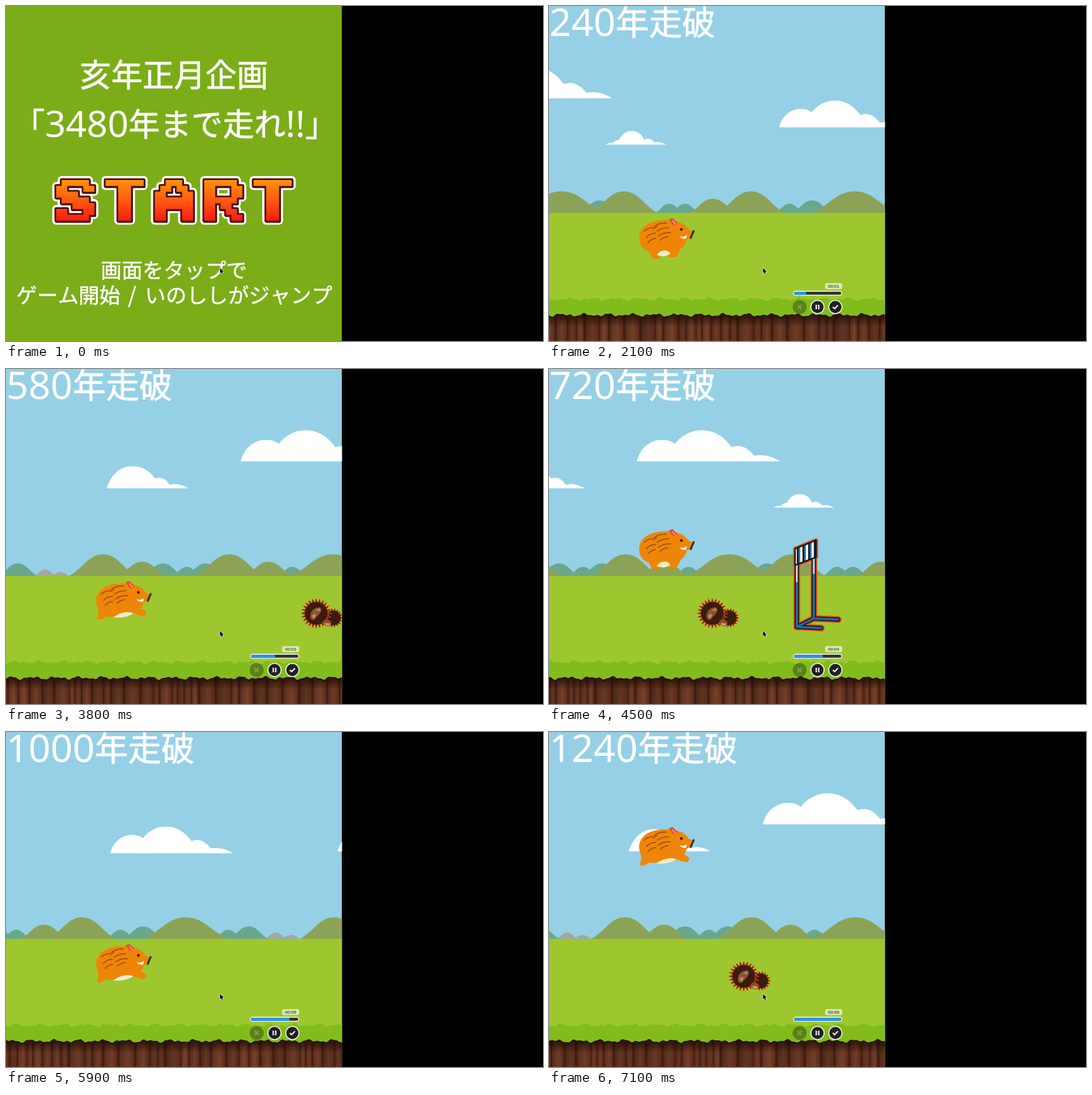
An HTML page with a canvas for the animation above (7200 ms loop, 947 by 591 pixels).

```html
<!DOCTYPE html>
<html lang="ja">
<head>
<meta charset="utf-8">
<style>
html, body { margin: 0; width: 100%; height: 100%; overflow: hidden; background: #000; }
canvas { display: block; }
</style>
</head>
<body>
<canvas id="stage" width="947" height="591"></canvas>
<script>
const ctx = document.getElementById('stage').getContext('2d');
const LOOP = 7200, STEP = 100, GAME_START = 900;
const VIEW = 592.5, WORLD = 1184, SPEED = 0.37;
const KANA = '"Noto Sans CJK JP", "Noto Sans CJK", sans-serif';

function fill(shape, color) {
  ctx.fillStyle = color;
  ctx.fill(typeof shape === 'string' ? new Path2D(shape) : shape);
}

function stroke(shape, color, width) {
  ctx.strokeStyle = color;
  ctx.lineWidth = width;
  ctx.stroke(typeof shape === 'string' ? new Path2D(shape) : shape);
}

function disc(x, y, r) {
  const p = new Path2D();
  p.arc(x, y, r, 0, 7);
  return p;
}

function box(x, y, w, h, r) {
  const p = new Path2D();
  p.roundRect(x, y, w, h, r);
  return p;
}

function at(x, y, draw, scale = 1) {
  ctx.save();
  ctx.translate(x, y);
  ctx.scale(scale, scale);
  draw();
  ctx.restore();
}

// Numerals use a wider face than the Japanese glyphs; a thin stroke adds weight.
function text(str, x, y, size) {
  ctx.fillStyle = ctx.strokeStyle = '#fff';
  ctx.lineWidth = size / 60;
  ctx.lineJoin = 'round';
  ctx.textAlign = 'left';
  for (const run of str.split(/([\d!]+)/)) {
    const latin = /[\d!]/.test(run), base = y - (latin ? 0 : 2);
    ctx.font = latin ? `${size * 1.165}px "Noto Sans", sans-serif` : `${size}px ${KANA}`;
    ctx.fillText(run, x, base);
    if (!latin) ctx.strokeText(run, x, base);
    x += ctx.measureText(run).width;
  }
}

// ---------- title ----------
const GLYPHS = {
  S: '.#####. ##...## ####... .#####. ...#### ##...## ######.',
  T: '###### ..##.. ..##.. ..##.. ..##.. ..##.. ..##..',
  A: '..###.. .##.##. ##...## ####### ####### ##...## ##...##',
  R: '######. ##...## ##...## ######. ##.##.. ##..##. ##...##'
};
const logo = new Path2D();
[...'START'].forEach((letter, i) => {
  GLYPHS[letter].split(' ').forEach((row, r) => {
    const w = 67 / row.length;
    [...row].forEach((c, k) => {
      if (c === '#') logo.rect(88.5 + i * 87 + k * w, 307 + r * 10.2, w + 0.3, 10.5);
    });
  });
});

function drawTitle() {
  ctx.fillStyle = '#7bad18';
  ctx.fillRect(0, 0, VIEW, 591);
  text('亥年正月企画', 130, 144, 55.4);
  text('「3480年まで走れ!!」', 13, 231, 55.4);
  text('画面をタップで', 167, 482, 36.9);
  text('ゲーム開始', 18, 526, 36.7);
  text('/', 215, 526, 38);
  text('いのししがジャンプ', 245, 526, 36.7);
  ctx.lineJoin = 'round';
  stroke(logo, '#fff', 14);
  stroke(logo, '#4b0f08', 6);
  at(0.8, 1.2, () => stroke(logo, '#4b0f08', 5));
  const heat = ctx.createLinearGradient(0, 307, 0, 379);
  heat.addColorStop(0, '#ff9208');
  heat.addColorStop(0.5, '#ff5a12');
  heat.addColorStop(1, '#fb1a10');
  fill(logo, heat);
}

// ---------- scenery ----------
const BIG = 'M0 0C6-25 24-38 45-38C55-38 62-35 67-31C78-45 95-55 114-55C138-55 155-42 167-25C185-32 197-22 207-10C225-13 241-8 252 0Z';
const MEDIUM = 'M0 0C8-20 20-39 45-39C63-39 77-31 86-17C97-22 106-15 112-6C124-10 136-5 145 0Z';
const SMALL = 'M0 0C6-3 9-4 14-3C16-6 19-8 24-8C29-18 37-24 47-24C58-24 65-18 69-8C75-14 82-9 87-4C97-6 103-2 108 0Z';

// Each range: colour, then groups of [height, half width, peak positions].
const RANGES = [
  ['#9fa9a1', [[11, 20, [1142]], [7, 18, [1169]]]],
  ['#69a88c', [[16, 26, [208, 394, 656, 684, 868, 1058]], [22, 36, [166, 241, 533, 908, 1094]]]],
  ['#8ca357', [[25, 43, [129, 352, 733]], [38, 61, [60, 283, 576, 800]], [38, 77, [466, 983]]]]
];

function hill(x, h, w) {
  return `M${x - w} 366C${x - w * 0.55} ${366 - h * 0.4} ${x - w * 0.42} ${365 - h} ${x} ${365 - h}` +
    `C${x + w * 0.42} ${365 - h} ${x + w * 0.55} ${366 - h * 0.4} ${x + w} 366Z`;
}

let seed = 12;
const random = () => (seed = seed * 16807 % 2147483647) / 2147483647;

function edge(base, size, phase) {
  const p = new Path2D();
  for (let x = 0; x <= WORLD; x += 2) {
    const a = x / WORLD * Math.PI * 2;
    p.lineTo(x, base + size * (Math.sin(a * 29 + phase) + 0.7 * Math.sin(a * 53 + 1) + 0.5 * Math.sin(a * 97 + 2)));
  }
  p.lineTo(WORLD, 600);
  p.lineTo(0, 600);
  return p;
}

const turf = edge(517, 1.7, 0), lip = edge(545, 1.7, 2), soil = edge(548, 1.8, 2.3);
const planks = [];
for (let x = 0; x < WORLD;) {
  const w = 10 + random() * 20;
  planks.push({ x, w, tone: random() });
  x += w;
}

function drawWorld() {
  at(303, 163, () => fill(BIG, '#fff'));
  at(850, 214, () => fill(BIG, '#fff'), 0.857);
  at(66, 210.5, () => fill(MEDIUM, '#fff'));
  at(543, 244.5, () => fill(SMALL, '#fff'));
  for (const [color, groups] of RANGES)
    for (const [h, w, peaks] of groups)
      for (const x of peaks) fill(hill(x, h, w), color);
  ctx.fillStyle = '#9ec72f';
  ctx.fillRect(0, 365, WORLD, 230);
  fill(turf, '#81bc1c');
  fill(lip, '#2c1005');
  ctx.save();
  ctx.clip(soil);
  for (const { x, w, tone } of planks) {
    const wood = ctx.createLinearGradient(x, 0, x + w, 0);
    wood.addColorStop(0, '#35140a');
    wood.addColorStop(0.2, `hsl(18 50% ${20 + tone * 6}%)`);
    wood.addColorStop(0.6, `hsl(18 48% ${25 + tone * 7}%)`);
    wood.addColorStop(1, '#57291a');
    ctx.fillStyle = wood;
    ctx.fillRect(x, 540, w + 1, 60);
  }
  const shade = ctx.createLinearGradient(0, 543, 0, 566);
  shade.addColorStop(0, 'rgba(25,6,0,.8)');
  shade.addColorStop(1, 'rgba(25,6,0,0)');
  ctx.fillStyle = shade;
  ctx.fillRect(0, 540, WORLD, 30);
  ctx.restore();
}

// ---------- obstacles ----------
function burr(x, y, r, spikes) {
  const p = new Path2D();
  for (let i = 0; i < spikes * 2; i++) {
    const a = i * Math.PI / spikes, d = i % 2 ? r * 0.72 : r;
    p.lineTo(x + d * Math.cos(a), y + d * Math.sin(a));
  }
  p.closePath();
  fill(p, '#e8500f');
  fill(disc(x, y, r * 0.72), '#3a1b0f');
  for (let i = 0; i < spikes; i++) {
    const a = i * Math.PI * 2 / spikes, c = Math.cos(a), s = Math.sin(a);
    stroke(`M${x + r * 0.6 * c} ${y + r * 0.6 * s}L${x + r * 0.88 * c} ${y + r * 0.88 * s}`, '#4a1c0d', 1.4);
  }
}

function chestnuts() {
  burr(30, 8, 18, 18);
  burr(0, 0, 28, 24);
  fill('M-10 8C-12-4-2-12 8-10C12-2 2 4-2 10C-5 13-9 12-10 8Z', '#8a5430');
  fill('M-7 7C-8 2-4 0 0 2L-3 9ZM-2-5L6-9 7-4Z', '#c08a58');
  fill('M12 15C14 10 20 10 26 14C28 19 26 23 20 23C15 22 12 19 12 15Z', '#8f4b2a');
  fill('M15 17L25 18 22 22 17 21Z', '#dba16e');
}

function hurdle() {
  const frame = 'M7 30V155L50 157M7 155L37 140L80 142M37 140V32';
  const panel = 'M4 17L41 2V32L4 46Z';
  ctx.lineJoin = ctx.lineCap = 'round';
  stroke(frame, '#ea4b14', 12);
  stroke(panel, '#ea4b14', 7);
  stroke(frame, '#101820', 7.5);
  stroke(frame, '#23699c', 4);
  stroke('M7 46V75M37 34V60', '#d0d4d6', 3);
  fill(panel, '#fff');
  ctx.save();
  ctx.clip(new Path2D(panel));
  for (let x = 3; x < 42; x += 10) {
    ctx.fillStyle = '#15202a';
    ctx.fillRect(x + 4, 0, 6, 50);
    ctx.fillStyle = '#2b75a8';
    ctx.fillRect(x + 7, 0, 3, 50);
  }
  ctx.restore();
  stroke(panel, '#15151a', 2.5);
}

const OBSTACLES = [
  { x: 547, y: 431, time: 3800, draw: chestnuts },
  { x: 430, y: 300, time: 4500, draw: hurdle },
  { x: 343.5, y: 431, time: 7100, draw: chestnuts }
];

// ---------- boar ----------
const JUMPS = [4372, 6725], JUMP_TIME = 1200, JUMP_HEIGHT = 240;
const LEGS = [
  'M172 425L178 437 182 446H194L198 432ZM206 432L210 443H225L236 420Z',
  'M174 425L181 443H192L196 432ZM214 430L219 443H231L232 436 237 420Z',
  'M160 412L163 428 160 441 168 442 176 437 192 437 196 420ZM216 424L232 434 244 436 248 430 244 425 238 423 230 415Z'
];
const BELLIES = [
  'M190 439C196 430 209 428 214 437C208 442 197 443 190 439Z',
  'M190 437C196 430 210 430 217 437Z',
  'M189 438C201 430 213 426 225 431C216 437 202 440 189 438Z'
];

function jumpHeight(t) {
  for (const start of JUMPS) {
    const u = (t - start) / JUMP_TIME;
    if (u > 0 && u < 1) return 4 * JUMP_HEIGHT * u * (1 - u);
  }
  return 0;
}

function drawBoar(pose) {
  const orange = '#ef8506';
  ctx.lineCap = ctx.lineJoin = 'round';
  fill(LEGS[pose], orange);
  fill('M159 409C159 388 181 377 208 378C228 378 241 385 246 394L252 397 250 409 243 412C240 425 230 432 216 435H184C169 433 159 425 159 409Z', orange);
  fill(BELLIES[pose], '#f6edc4');
  if (pose === 1) fill('M226 431C233 427 240 420 242 412C236 418 229 420 226 431Z', '#f6edc4');
  stroke('M168 397Q175 391 183 391M186 389Q194 382 207 383M172 408Q178 401 188 401M191 397Q200 391 211 391' +
    'M175 417Q180 411 188 410M193 406Q202 399 214 400M196 413Q203 407 210 407M184 393L190 389', '#a6530f', 2);
  fill(pose === 1 ? 'M215 375L225 380 228 387 222 390 217 385Z' : 'M211 376L218 374 226 382 224 387 218 386Z', '#e8502e');
  stroke('M218 379L223 385', '#ef9a90', 2);
  fill(disc(233.5, 394, 2.6), '#4a2a12');
  fill('M230 406Q237 409 243 404L242 410Q235 412 230 406Z', '#fff');
  stroke('M255 397L250 409', '#40301c', 3.6);
}

// ---------- overlay ----------
function drawRecorder(t) {
  const seconds = Math.max(0, Math.floor((t - 200) / 1000));
  fill(box(487, 489, 30, 10.5, 3), 'rgba(235,245,210,.8)');
  ctx.fillStyle = '#111';
  ctx.font = '8px "Liberation Sans", sans-serif';
  ctx.textAlign = 'center';
  ctx.fillText('00:0' + seconds, 502, 497);
  fill(box(430.5, 502.5, 86.5, 8.5, 4.2), '#fff');
  fill(box(432, 504, 83.5, 5.5, 2.7), '#333');
  fill(box(432, 504, Math.max(1, Math.min(83.5, 12 + (t - 1300) * 0.01224)), 5.5, 2.7), '#2c93ec');
  ctx.lineCap = 'butt';
  fill(disc(442, 531, 12.3), 'rgba(50,75,20,.5)');
  stroke('M438.5 527.5L445.5 534.5M445.5 527.5L438.5 534.5', 'rgba(150,180,90,.6)', 2.5);
  for (const x of [473.5, 505]) {
    fill(disc(x, 531, 12.5), '#f2f5ea');
    fill(disc(x, 531, 10.7), '#222');
  }
  stroke('M471.3 527V535M475.7 527V535', '#fff', 2.2);
  stroke('M500.5 531L503.7 534L509.5 528', '#fff', 2.3);
}

function drawCursor() {
  const arrow = 'M377.5 462V471.5L379.5 469.7L381 473L382.6 472.2L381.2 469H384Z';
  stroke(arrow, '#fff', 1.4);
  fill(arrow, '#000');
}

function drawGame(t) {
  const elapsed = t - GAME_START, scroll = elapsed * SPEED % WORLD;
  ctx.fillStyle = '#95d0e6';
  ctx.fillRect(0, 0, VIEW, 591);
  at(-scroll, 0, drawWorld);
  at(WORLD - scroll, 0, drawWorld);
  for (const o of OBSTACLES) {
    const x = o.x - (t - o.time) * SPEED;
    if (x > -120 && x < VIEW + 40) at(x, o.y, o.draw);
  }
  at(0, -jumpHeight(t), () => drawBoar(t / STEP % 3));
  text(elapsed / 5 + '年走破', 0.5, 53, 58.6);
}

function render(now) {
  const t = Math.floor(now % LOOP / STEP) * STEP;
  ctx.fillStyle = '#000';
  ctx.fillRect(0, 0, 947, 591);
  ctx.save();
  ctx.beginPath();
  ctx.rect(0, 0, VIEW, 591);
  ctx.clip();
  if (t < GAME_START) drawTitle(); else drawGame(t);
  if (t > 0) drawRecorder(t);
  drawCursor();
  ctx.restore();
}

const start = performance.now();
function tick() {
  render(performance.now() - start);
  requestAnimationFrame(tick);
}
tick();
</script>
</body>
</html>
```
